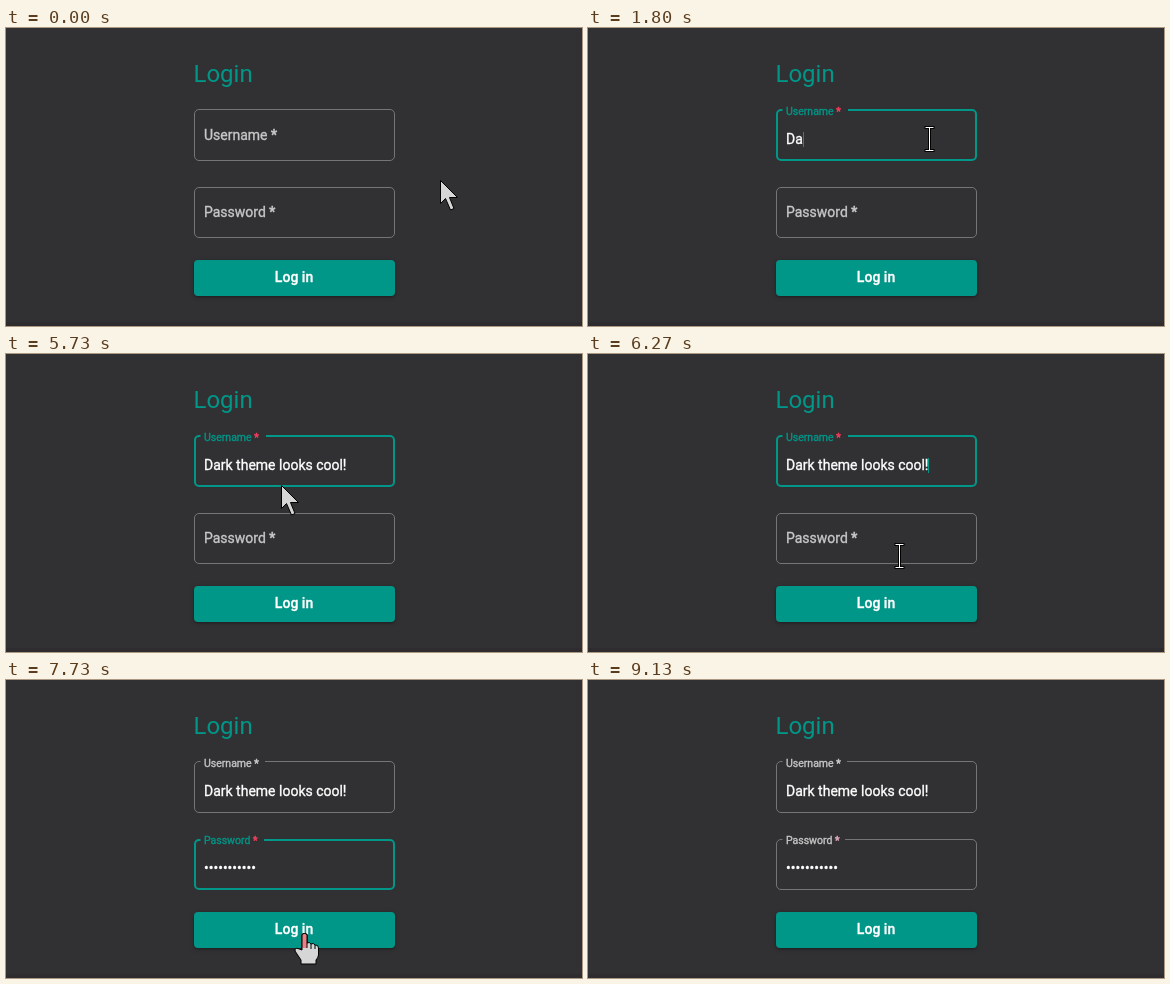
An HTML page for the animation above (9900 ms loop, 576 by 298 pixels).

```html
<!DOCTYPE html>
<html lang="en">
<head>
<meta charset="utf-8">
<title>Login form</title>
<style>
  html, body { margin: 0; width: 100%; height: 100%; overflow: hidden; background: #313133; }
  svg { display: block; width: 576px; height: 298px; }
  text { font: 400 14px Roboto, Arial, sans-serif; white-space: pre; stroke-width: .35px; }
  tspan { stroke-width: .6px; }
  .title { font-size: 24px; fill: #009688; }
  .action { font-weight: 500; fill: #fff; stroke: #fff; text-anchor: middle; }
  .button { fill: #009688; filter: drop-shadow(0 1px 1px rgba(0,0,0,.25)) drop-shadow(0 1px 2px rgba(0,0,0,.2)); }
</style>
</head>
<body>
<svg viewBox="0 0 576 298">
  <defs><clipPath id="buttonClip"><rect x="188" y="232" width="201" height="36" rx="4"/></clipPath></defs>
  <rect width="576" height="298" fill="#313133"/>
  <rect y="294" width="576" height="4" fill="#2f2c30"/>
  <text class="title" x="187.5" y="54">Login</text>
  <g id="form"></g>
  <rect class="button" x="188" y="232" width="201" height="36" rx="4"/>
  <circle id="ripple" fill="#fff" clip-path="url(#buttonClip)"/>
  <text class="action" x="288" y="254">Log in</text>
  <g id="pointer" stroke-linejoin="round">
    <path id="arrow" d="M.5 .5V23.5L5.5 18.5L10.5 30L14 28.5L9.5 17.5H17.5Z" fill="#d6d6d6" stroke="#000"/>
    <g id="beam" fill="none" stroke-linecap="square">
      <path d="M-3 -10.5H4M-3 12.5H4M.5 -10V12" stroke="#000" stroke-width="3"/>
      <path d="M-3 -10.5H4M-3 12.5H4M.5 -10V12" stroke="#fff"/>
    </g>
    <g id="hand" stroke="#000">
      <path d="M-2 17V2Q-2 .5 .5 .5T3 2V10Q5.5 8.5 7 11Q9.5 9.5 11 12Q14.5 11.5 14.5 15V22Q14 25 12 27V31H-3V27L-9 18Q-9 14.5 -6 15.5Z" fill="#d6d6d6"/>
      <path d="M-2 15V2Q-2 .5 .5 .5T3 2V15" fill="#ec8085"/>
      <path d="M7 11V16M11 12V16" fill="none"/>
    </g>
  </g>
</svg>
<script>
const LOOP = 9900, STEP = 200 / 3, BLINK = 530, CLICK = 7870, LEAVE = 9130;
const LEFT = 188, RIGHT = 389, TEXT_X = 198;
const TEAL = [0, 150, 136], GREY = [200, 200, 201], RED = [238, 63, 92], PINK = [224, 166, 187];

const $ = id => document.getElementById(id);
const clamp = v => Math.min(1, Math.max(0, v));
const mix = (a, b, p) => a + (b - a) * p;
const smooth = p => p * p * (3 - 2 * p);
const blend = (a, b, p) => `rgb(${a.map((v, i) => Math.round(mix(v, b[i], p)))})`;

function set(el, attrs) {
  for (const name in attrs) el.setAttribute(name, attrs[name]);
}
function add(parent, tag, attrs, content = "") {
  const el = document.createElementNS("http://www.w3.org/2000/svg", tag);
  set(el, attrs);
  el.textContent = content;
  return parent.appendChild(el);
}
const paint = (el, color) => set(el, { fill: color, stroke: color });

// cubic-bezier(.25, .8, .25, 1)
function ease(x) {
  x = clamp(x);
  let lo = 0, hi = 1;
  for (let i = 0; i < 24; i++) {
    const s = (lo + hi) / 2;
    if (.75 * s * (1 - s) + s ** 3 < x) lo = s; else hi = s;
  }
  return 2.4 * lo * (1 - lo) ** 2 + 3 * lo * lo * (1 - lo) + lo ** 3;
}

// Each burst types its text at an even pace between two times
const fields = [
  {
    name: "Username", top: 81, height: 52, base: 112, gap: 260, focus: 570, blur: 6330,
    hint: "v@il-mobni.dk", restStar: GREY,
    bursts: [["Dark", 1600, 2000], [" theme ", 2670, 3330], ["looks ", 3600, 4270], ["cool!", 4670, 5200]]
  },
  {
    name: "Password", top: 159, height: 51, base: 189, gap: 258, focus: 6330, blur: CLICK,
    hint: "", restStar: PINK,
    bursts: [["\u2022".repeat(11), 6530, 7200]]
  }
];

for (const f of fields) {
  const form = $("form"), y = f.base + 4;
  f.value = f.bursts.map(b => b[0]).join("");
  f.keys = f.bursts.flatMap(([s, from, to]) => [...s].map((_, i) => mix(from, to, i / (s.length - 1))));
  f.frame = add(form, "path", { fill: "none" });
  f.label = add(form, "text", { x: TEXT_X }, f.name + " ");
  f.star = add(f.label, "tspan", {}, "*");
  f.placeholder = add(form, "text", { x: TEXT_X, y, fill: "#fff", stroke: "#fff" }, f.hint);
  f.text = add(form, "text", { x: TEXT_X, y, fill: "#fff", stroke: "#fff" });
  f.caret = add(form, "rect", { y: f.base - 8, width: 1, height: 15, fill: "#009688" });
}

// Rounded outline, open at the top where the label sits
function outline(f, w, gap) {
  const i = w / 2, l = LEFT + i, r = RIGHT - i, t = f.top + i, b = f.top + f.height - i, c = 5 - i;
  const arc = (x, y) => `A${c} ${c} 0 0 1 ${x} ${y}`;
  return `M${gap} ${t}H${r - c}${arc(r, t + c)}V${b - c}${arc(r - c, b)}` +
    `H${l + c}${arc(l, b - c)}V${t + c}${arc(l + c, t)}H194.5`;
}

function drawField(f, t) {
  const floated = t >= f.focus, active = floated && t < f.blur;
  const rise = ease((t - f.focus) / 400), fade = ease((t - f.blur) / 300);
  const typed = f.keys.filter(k => t + 4 >= k).length;
  const tint = (rest, focused, end) => t < f.blur ? blend(rest, focused, rise) : blend(focused, end, fade);
  const width = active ? 2 : 1;

  set(f.frame, {
    d: outline(f, width, floated ? f.gap - 2 + width : 194),
    stroke: active ? "#009688" : "#757577", "stroke-width": width
  });
  set(f.label, { y: mix(f.base, f.base - 25, rise) });
  f.label.style.fontSize = mix(14, 10.5, rise) + "px";
  paint(f.label, tint(GREY, TEAL, GREY));
  paint(f.star, tint(GREY, RED, f.restStar));
  set(f.placeholder, { opacity: typed ? 0 : .4 * ease((t - f.focus - 133) / 400) });

  f.text.textContent = f.value.slice(0, typed);
  const since = t + 4 - (typed ? f.keys[typed - 1] : f.focus);
  const lit = active && Math.floor(since / BLINK) % 2 === 0;
  set(f.caret, {
    x: Math.round(TEXT_X + (typed ? f.text.getComputedTextLength() : 0)),
    opacity: lit ? 1 : 0
  });
}

// Pointer stops: time, x, y
const route = [
  [0, 434, 152], [530, 341, 110], [5670, 341, 110], [5730, 275, 131], [6130, 275, 238],
  [6330, 322, 190], [6600, 335, 187], [6800, 387, 210], [7030, 443, 226],
  [7730, 298, 253], [8800, 295, 264], [LEAVE, 130, 290]
];

function drawPointer(t) {
  const next = Math.max(1, route.findIndex(stop => stop[0] > t));
  const [a, ax, ay] = route[next - 1], [b, bx, by] = route[next];
  const p = smooth(clamp((t - a) / (b - a)));
  const x = Math.round(mix(ax, bx, p)), y = Math.round(mix(ay, by, p));
  const overText = x > 190 && x < 386 && fields.some(f => y > f.top + 2 && y < f.top + 48);
  const overButton = x >= LEFT && x < RIGHT && y >= 232 && y < 268;
  const kind = overText ? "beam" : overButton ? "hand" : "arrow";
  for (const id of ["arrow", "beam", "hand"]) $(id).style.display = id === kind ? "" : "none";
  set($("pointer"), { transform: `translate(${x} ${y})`, visibility: t + 4 < LEAVE ? "visible" : "hidden" });
}

function drawRipple(t) {
  const age = t - CLICK;
  set($("ripple"), {
    cx: 298, cy: 253, r: 112 * ease(age / 450),
    opacity: age < 0 ? 0 : .1 * (1 - ease((age - 450) / 400))
  });
}

const start = performance.now();
function draw(now) {
  const t = Math.floor(((Math.max(0, now - start) % LOOP) + 4) / STEP) * STEP;
  fields.forEach(f => drawField(f, t));
  drawRipple(t);
  drawPointer(t);
  requestAnimationFrame(draw);
}
draw(start);
</script>
</body>
</html>
```
